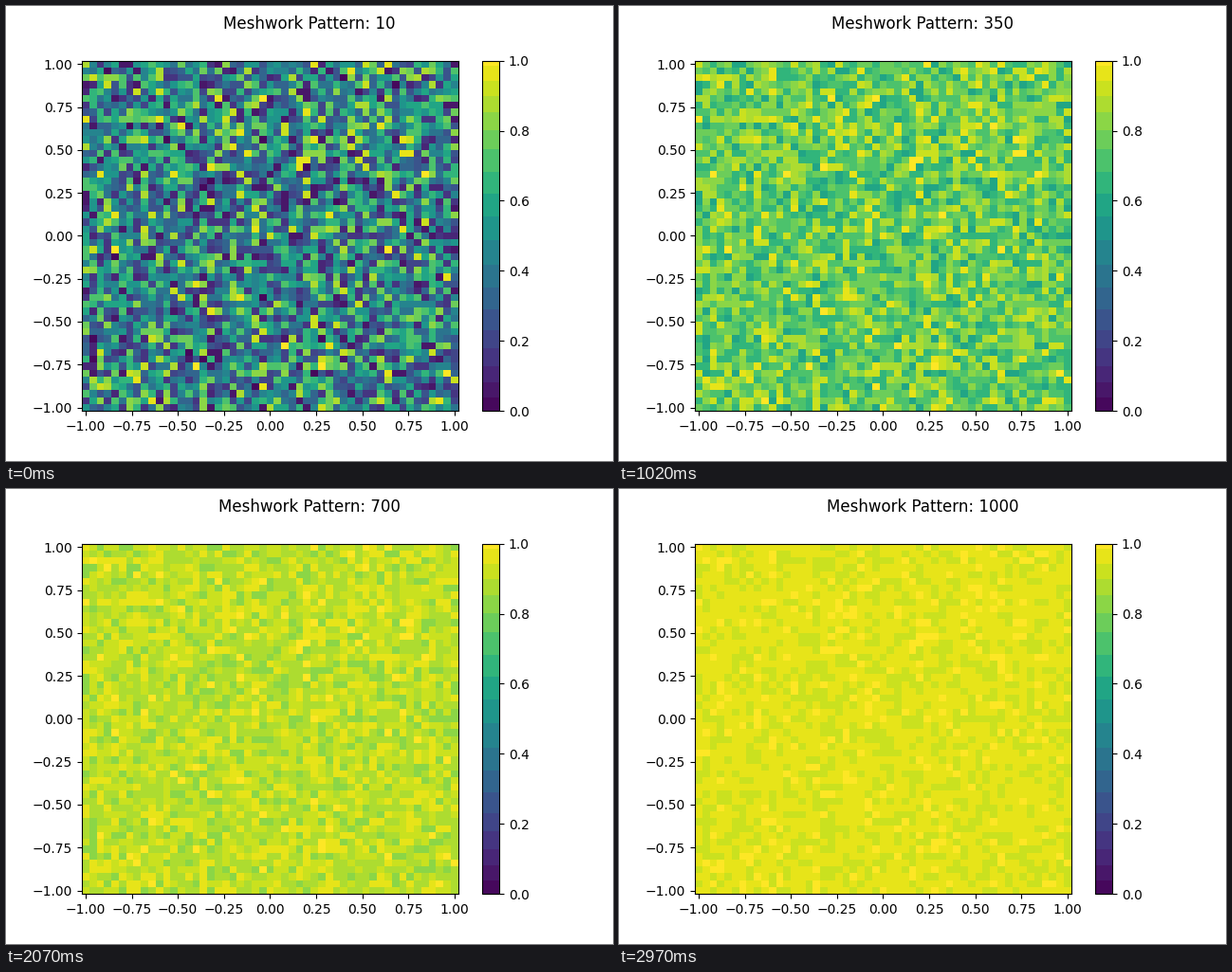
These frames come from a looping animation (640 by 480 pixels, 3000 ms). A matplotlib script:

```python
import numpy as np
import matplotlib.pyplot as plt
from matplotlib.animation import FuncAnimation
from matplotlib.colors import ListedColormap

FRAMES = 100
STEP = 10
DECAY = 400
SIZE = 51
BANDS = 18.4


def warp(t):
    """Narrow bands near both ends of the scale, wide ones in the middle."""
    t = np.minimum(t, 1)
    return t - 0.04 * np.sin(2 * np.pi * t)


def banded_cmap():
    index = np.arange(np.ceil(BANDS))
    edges = warp(index / BANDS)
    mids = warp((index + 0.5) / BANDS)
    levels = (np.arange(256) + 0.5) / 256
    band = np.searchsorted(edges, levels) - 1
    return ListedColormap(plt.get_cmap("viridis")(mids[band]))


start = np.random.default_rng(7).beta(1.3, 1.6, (SIZE, SIZE))


def field_at(count):
    return 1 - (1 - start) * np.exp(-count / DECAY)


def label(count):
    return f"Meshwork Pattern: {count}"


axis = np.linspace(-1, 1, SIZE)
fig, ax = plt.subplots(figsize=(6.4, 4.8), dpi=100)
mesh = ax.pcolormesh(axis, axis, field_at(STEP), shading="nearest",
                     cmap=banded_cmap(), vmin=0, vmax=1)
fig.colorbar(mesh, ax=ax)
title = fig.suptitle(label(STEP))


def update(i):
    count = STEP * (i + 1)
    mesh.set_array(field_at(count))
    title.set_text(label(count))
    return mesh, title


anim = FuncAnimation(fig, update, frames=FRAMES, interval=30, repeat=True,
                     repeat_delay=0, blit=False)
plt.show()
```
